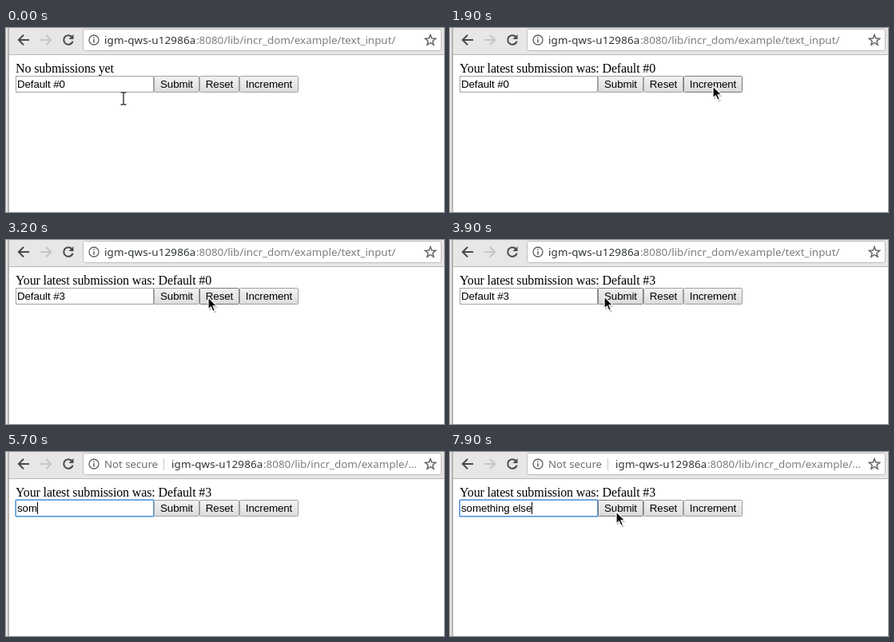
These frames come from a looping animation (548x231 px, 8000 ms). An HTML page:

```html
<!DOCTYPE html>
<html lang="en">
<head>
<meta charset="utf-8">
<title>Text input</title>
<style>
html, body { margin: 0; width: 100%; height: 100%; overflow: hidden; background: #fff; }
#stage { position: relative; width: 548px; height: 231px; overflow: hidden; background: #fff; }
svg { position: absolute; left: 0; top: 0; }
span { position: absolute; white-space: pre; color: #000; }
.url { font: 13.4px/18px "Noto Sans", sans-serif; top: 6px; }
.page { font: 16px/18px "Liberation Serif", "Times New Roman", serif; letter-spacing: -.14px; left: 12px; top: 42px; }
.ui { font: 13.333px/15px "Liberation Sans", Arial, sans-serif; letter-spacing: -.1px; top: 63px; }
.btn { text-align: center; }
#host { color: #2e3436; letter-spacing: .16px; }
#rest { color: #7b7d7e; }
#note { color: #6a6c6d; left: 123px; font-size: 13.2px; }
</style>
</head>
<body>
<div id="stage">
  <svg id="back" width="548" height="231">
    <defs>
      <linearGradient id="up" x2="0" y2="1"><stop stop-color="#f3f3f3"/><stop offset="1" stop-color="#dcdcdc"/></linearGradient>
      <linearGradient id="over" x2="0" y2="1"><stop stop-color="#f0f0f0"/><stop offset="1" stop-color="#dadada"/></linearGradient>
      <linearGradient id="down" x2="0" y2="1"><stop stop-color="#d2d2d2"/><stop offset="1" stop-color="#e4e4e4"/></linearGradient>
    </defs>
    <!-- window frame and toolbar -->
    <rect width="548" height="33" fill="#e8e7e6"/>
    <rect y="33" width="548" height="1" fill="#b9b9b9"/>
    <rect width="2" height="231" fill="#e8e7e6"/>
    <rect x="2" width="2" height="231" fill="#b4b4b4"/>
    <rect x="96.5" y="1.5" width="448" height="27" rx="3" fill="#fff" stroke="#bcbcbc"/>
    <!-- toolbar icons -->
    <g fill="none" stroke-width="2">
      <path d="M29 15H16.5M22 8.8L15.8 15L22 21.2" stroke="#4a4a4a"/>
      <path d="M43 15H55.5M50 8.8L56.2 15L50 21.2" stroke="#c6c5c4"/>
      <path d="M82.3 11A5.8 5.8 0 1 0 83.6 16.6" stroke="#4a4a4a"/>
      <path d="M84.5 8V14H78.5Z" fill="#4a4a4a" stroke="none"/>
      <g stroke="#5f5f5f" stroke-width="1.3">
        <circle cx="110" cy="15" r="6"/>
        <path d="M110 14V18.4M110 11.2V12.7" stroke-width="1.5"/>
        <path id="star" stroke-width="1.4"/>
      </g>
    </g>
    <rect id="bar" x="197" y="8" width="1" height="15" fill="#c8c8c8"/>
    <!-- text field -->
    <rect id="ring" x="11.5" y="59.5" width="174" height="22" rx="1.5" fill="none" stroke="#8fbbe6"/>
    <rect id="field" x="12.5" y="60.5" width="172" height="20" fill="#fff"/>
    <rect id="mark" x="14" y="63" height="15" fill="#4a90d9"/>
    <rect id="caret" y="63" width="1" height="15"/>
    <g id="buttons"></g>
  </svg>
  <span class="url" id="note">Not secure</span>
  <span class="url" id="host">igm-qws-u12986a</span>
  <span class="url" id="rest"></span>
  <span class="page" id="line"></span>
  <span class="ui" id="value" style="left:14px"></span>
  <div id="labels"></div>
  <svg width="548" height="231">
    <g id="beam">
      <path d="M-3.5 .8H-1L0 1.5L1 .8H3.5M0 1.5V15.5M-3.5 16.2H-1L0 15.5L1 16.2H3.5" fill="none" stroke="#fff" stroke-width="2.6"/>
      <path d="M-3.5 .8H-1L0 1.5L1 .8H3.5M0 1.5V15.5M-3.5 16.2H-1L0 15.5L1 16.2H3.5" fill="none" stroke="#111" stroke-width="1.2"/>
    </g>
    <g id="pointer">
      <path d="M1 1V16L4.5 13L7 18.6L10 17.4L7.5 12H12Z" fill="#000" opacity=".25"/>
      <path d="M0 -1V14L3.4 10.9L5.9 16.6L8.5 15.4L6.1 9.9H10.8Z" fill="#0c0c0c" stroke="#fff" stroke-width="1.2"/>
    </g>
  </svg>
</div>
<script>
const LOOP = 8000, TICK = 100;
const el = id => document.getElementById(id);
const show = (id, on) => { el(id).style.display = on ? "" : "none"; };
const within = (t, a, b) => t >= a && t < b;
// Last value whose start time has passed.
const at = (list, t) => list.reduce((v, [start, next]) => t >= start ? next : v, list[0][1]);

const buttons = [
  { text: "Submit", x: 185, w: 57, presses: [[1100, 1400], [3600, 3700]] },
  { text: "Reset", x: 242, w: 50, presses: [] },
  { text: "Increment", x: 292, w: 74, presses: [[2200, 2300], [2500, 2600], [2800, 2900]] }
];
// time, x, y of the mouse
const path = [
  [500, 147, 80], [900, 218, 74], [1000, 218, 74], [1100, 214, 72], [1400, 214, 72],
  [1900, 329, 74], [2900, 329, 74], [3300, 228, 73], [3400, 228, 73], [3500, 208, 72],
  [3700, 208, 72], [3900, 193, 72], [4000, 183, 74], [4300, 181, 76], [7100, 181, 76],
  [7200, 37, 80], [7300, 37, 80], [7600, 182, 58], [7700, 182, 58], [7900, 208, 76]
];
const typed = [
  [5500, 1], [5600, 2], [5700, 3], [5800, 4], [5900, 5], [6000, 7],
  [6100, 8], [6200, 9], [6300, 11], [6400, 13], [6500, 14]
];
const count = [[0, 0], [2300, 1], [2600, 2], [2900, 3]];
const message = [
  [0, "No submissions yet"],
  [1400, "Your latest submission was: Default #0"],
  [3700, "Your latest submission was: Default #3"]
];

function build() {
  const points = Array.from({ length: 10 }, (_, i) => {
    const r = i % 2 ? 3 : 7, a = i * Math.PI / 5 - Math.PI / 2;
    return (531 + r * Math.cos(a)).toFixed(2) + " " + (15.5 + r * Math.sin(a)).toFixed(2);
  });
  el("star").setAttribute("d", "M" + points.join("L") + "Z");
  for (const b of buttons) {
    b.box = document.createElementNS("http://www.w3.org/2000/svg", "rect");
    const size = { x: b.x + .5, y: 60.5, width: b.w - 1, height: 20, rx: 1 };
    for (const k in size) b.box.setAttribute(k, size[k]);
    el("buttons").append(b.box);
    const label = document.createElement("span");
    label.className = "ui btn";
    label.textContent = b.text;
    label.style.left = b.x + "px";
    label.style.width = b.w + "px";
    el("labels").append(label);
  }
}

function mouse(t) {
  const i = path.findIndex(p => p[0] > t);
  if (i === 0) return path[0].slice(1);
  if (i < 0) return path[path.length - 1].slice(1);
  const [a, b] = [path[i - 1], path[i]], k = (t - a[0]) / (b[0] - a[0]);
  return [1, 2].map(n => Math.round(a[n] + (b[n] - a[n]) * k));
}

function draw(t) {
  const [x, y] = mouse(t);
  const visible = !within(t, 4500, 7100), inField = x < 185;
  const typing = t >= 5500, focus = within(t, 300, 1100) || t >= 4300;
  const selected = within(t, 4400, 5500);

  show("note", typing);
  show("bar", typing);
  el("host").style.left = (typing ? 207 : 123) + "px";
  el("rest").style.left = (typing ? 322 : 238) + "px";
  el("rest").textContent = ":8080/lib/incr_dom/example/" + (typing ? "..." : "text_input/");

  el("line").textContent = at(message, t);
  const value = el("value");
  value.textContent = typing ? "something else".slice(0, at(typed, t)) : "Default #" + at(count, t);
  value.style.color = selected ? "#fff" : "#000";
  const width = Math.round(value.getBoundingClientRect().width);

  show("ring", focus);
  el("field").setAttribute("stroke", focus ? "#5a9bdc" : "#a3a3a3");
  show("mark", selected);
  el("mark").setAttribute("width", width);
  show("caret", focus && !selected && !within(t, 800, 1100) && !within(t, 7100, 7800));
  el("caret").setAttribute("x", 14 + width);

  for (const b of buttons) {
    const over = visible && within(x, b.x, b.x + b.w);
    const down = b.presses.some(p => within(t, ...p));
    b.box.setAttribute("fill", `url(#${down ? "down" : over ? "over" : "up"})`);
    b.box.setAttribute("stroke", over ? "#787878" : "#a0a0a0");
  }

  show("beam", visible && inField);
  show("pointer", visible && !inField);
  el("beam").setAttribute("transform", `translate(${x} ${y})`);
  el("pointer").setAttribute("transform", `translate(${x} ${y})`);
}

build();
const begin = performance.now();
function loop() {
  const t = (performance.now() - begin) % LOOP;
  draw(Math.floor(t / TICK) * TICK);
  requestAnimationFrame(loop);
}
loop();
</script>
</body>
</html>
```
